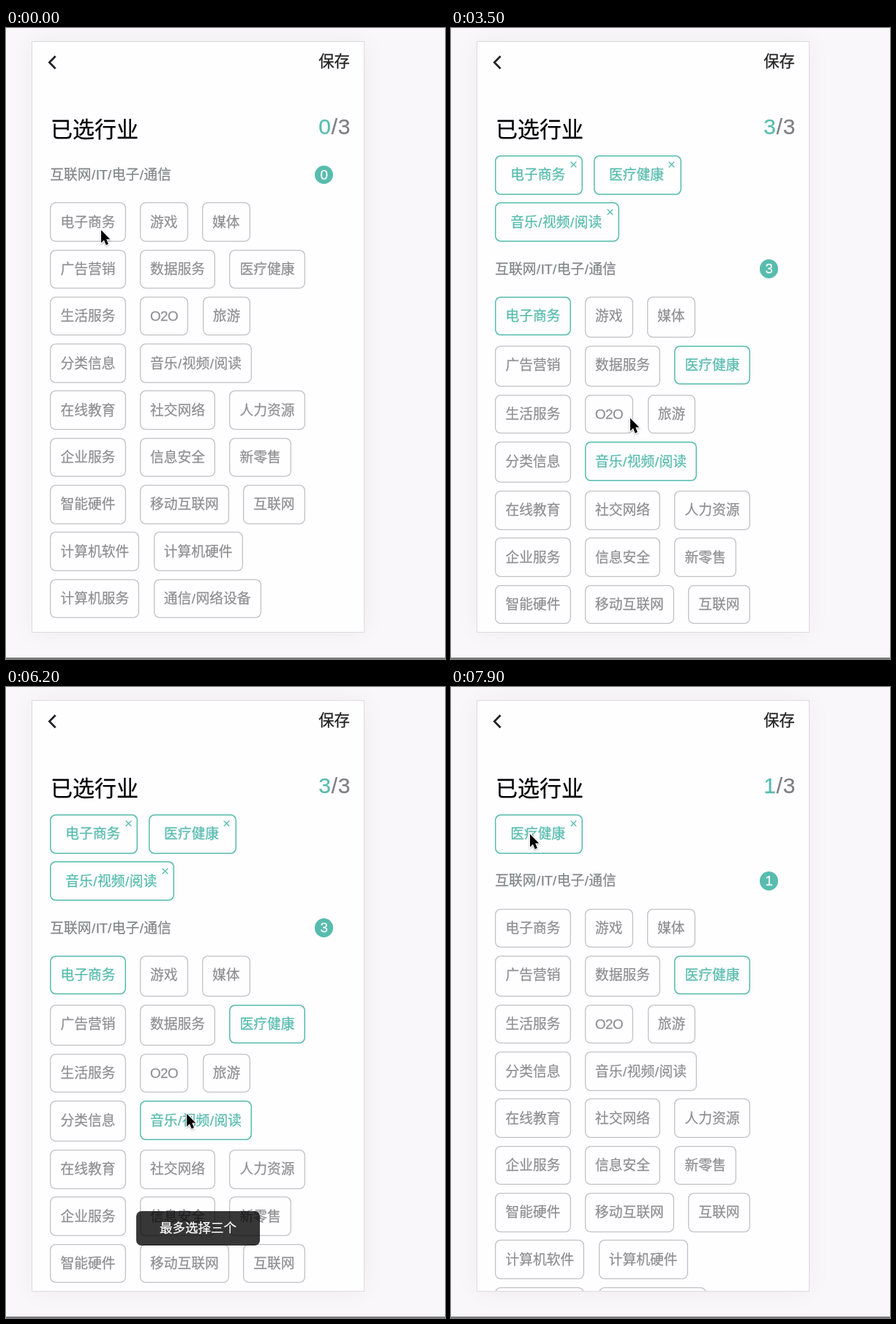
Write an HTML page that moves like this. It is 600x862 px and loops after 8000 ms.

```html
<!DOCTYPE html>
<html lang="zh-CN">
<head>
<meta charset="utf-8">
<title>选择行业</title>
<style>
  :root { --teal: #57bcae; }
  html, body { margin: 0; width: 100%; height: 100%; overflow: hidden; background: #f9f7f9; }
  #stage {
    position: relative; width: 600px; height: 862px; overflow: hidden; background: #f9f7f9;
    font: 18.76px/53.6px "Liberation Sans", "Noto Sans CJK SC", "Noto Sans CJK", sans-serif;
    color: #8f8f92; white-space: nowrap; -webkit-text-stroke: .25px;
  }
  #stage > * { position: absolute; }
  i { font-style: normal; padding: 0 .027em; }
  em { font-style: normal; letter-spacing: -.027em; }
  .panel {
    left: 35px; top: 18px; width: 453px; height: 806px; background: #fefdff;
    border: 1px solid #dcdbdf; box-shadow: 0 0 30px rgba(0, 0, 0, .05);
  }
  .floor { left: 0; top: 860px; width: 600px; height: 2px; background: #7c7c7e; }
  .save { right: 130px; top: 20px; font-size: 21.4px; color: #222; }
  .title { left: 61px; top: 112px; font-size: 30px; color: #000; }
  .count { right: 129.5px; top: 108px; font-size: 30px; color: #7f7f83; }
  .count b { font-weight: 400; color: var(--teal); }
  .list { left: 60.3px; top: 174px; width: 410px; height: 651px; overflow: hidden; }
  .row { display: flex; flex-wrap: wrap; align-content: flex-start; }
  .chip, .tag {
    box-sizing: border-box; min-height: 53.6px; border-radius: 8px; padding: .4px 14.2px 0;
    margin: 0 19.2px 10.7px 0; line-height: 53.2px; box-shadow: inset 0 0 0 1.3px #c3c1c7;
  }
  .tag, .chip.on { color: var(--teal); box-shadow: inset 0 0 0 1.5px var(--teal); }
  .chip.on { margin-bottom: 13.4px; }
  .tag { position: relative; padding: .4px 24.2px 0 21px; margin-right: 14.6px; }
  .tag svg { position: absolute; right: 8.8px; top: 8.3px; }
  .label { position: relative; height: 64.3px; color: #838588; }
  .badge {
    position: absolute; left: 361.6px; top: 13.8px; width: 25.6px; height: 25.6px;
    border-radius: 50%; background: var(--teal); color: #fff; text-align: center; line-height: 26px;
  }
  .toast {
    left: 178px; top: 716px; width: 169px; height: 47px; border-radius: 7px;
    background: rgba(0, 0, 0, .78); color: #fff; font-size: 17.5px; line-height: 47px; text-align: center;
  }
  .cursor { left: 0; top: 0; overflow: visible; filter: drop-shadow(0 1px 1px rgba(0, 0, 0, .3)); }
</style>
</head>
<body>
<div id="stage">
  <div class="panel"></div>
  <div class="floor"></div>
  <svg style="left:55px;top:34px" width="18" height="26" fill="none" stroke="#222" stroke-width="2.7"><path d="M12.6 4.5 4.3 13l8.3 8.5"/></svg>
  <div class="save">保存</div>
  <div class="title">已选行业</div>
  <div class="count"><b></b><i>/</i>3</div>
  <div class="list">
    <div class="row tags"></div>
    <div class="label">互联网<i>/</i><em>IT</em><i>/</i>电子<i>/</i>通信<span class="badge"></span></div>
    <div class="row chips"></div>
  </div>
  <div class="toast">最多选择三个</div>
  <svg class="cursor" width="14" height="23"><path d="M0 0V17.4L4 13.8 6.7 20.4 9.9 19.1 7.2 12.6H12.3Z" fill="#000" stroke="#fff" stroke-width="2" paint-order="stroke"/></svg>
</div>
<script>
const LOOP = 8000, TICK = 100;
const names = ('电子商务 游戏 媒体 广告营销 数据服务 医疗健康 生活服务 O2O 旅游 分类信息 音乐/视频/阅读 ' +
  '在线教育 社交网络 人力资源 企业服务 信息安全 新零售 智能硬件 移动互联网 互联网 ' +
  '计算机软件 计算机硬件 计算机服务 通信/网络设备').split(' ');

// [time, indexes of the chosen chips]
const choices = [
  [0, []], [1000, [0]], [2400, [0, 5]], [3300, [0, 5, 10]], [6400, [0, 5]], [7600, [5]]
];
// [time, x, y]
const cursorPath = [
  [0, 130, 276], [1400, 130, 276], [2300, 325, 393], [2400, 325, 393], [3200, 245, 533],
  [4200, 245, 533], [4600, 242, 496], [4800, 221, 456], [5600, 221, 456], [6200, 247, 583],
  [6600, 247, 583], [7000, 199, 222], [7500, 108, 201], [LOOP, 108, 201]
];
// [time, opacity]
const toastFade = [[0, 0], [4900, 0], [5300, 1], [7100, 1], [7500, 0], [LOOP, 0]];

const $ = selector => document.querySelector(selector);
const linear = p => p;
const smooth = p => p * p * (3 - 2 * p);
const markup = text => text.replace(/[A-Z0-9]+/g, '<em>$&</em>').replace(/\/(?!em)/g, '<i>/</i>');
const cross = '<svg width="9" height="9" stroke="#57bcae" stroke-width="1.3"><path d="M.7.7l7.6 7.6M8.3.7.7 8.3"/></svg>';

$('.chips').innerHTML = names.map(n => `<div class="chip">${markup(n)}</div>`).join('');
const chips = [...document.querySelectorAll('.chip')];

function sample(keys, t, ease) {
  const next = keys.findIndex(k => k[0] > t);
  const a = keys[next - 1], b = keys[next];
  const p = ease((t - a[0]) / (b[0] - a[0]));
  return a.slice(1).map((v, i) => v + (b[i + 1] - v) * p);
}

let shown;
function showChoice(chosen) {
  if (chosen === shown) return;
  shown = chosen;
  $('.tags').innerHTML = chosen.map(i => `<div class="tag">${markup(names[i])}${cross}</div>`).join('');
  chips.forEach((chip, i) => chip.classList.toggle('on', chosen.includes(i)));
  $('.count b').textContent = $('.badge').textContent = chosen.length;
}

const start = performance.now();
function draw() {
  const t = Math.floor((performance.now() - start) % LOOP / TICK) * TICK;
  showChoice(choices.filter(c => c[0] <= t).pop()[1]);
  const [x, y] = sample(cursorPath, t, smooth);
  $('.cursor').style.transform = `translate(${x}px, ${y}px)`;
  $('.toast').style.opacity = sample(toastFade, t, linear)[0];
  requestAnimationFrame(draw);
}
draw();
</script>
</body>
</html>
```
